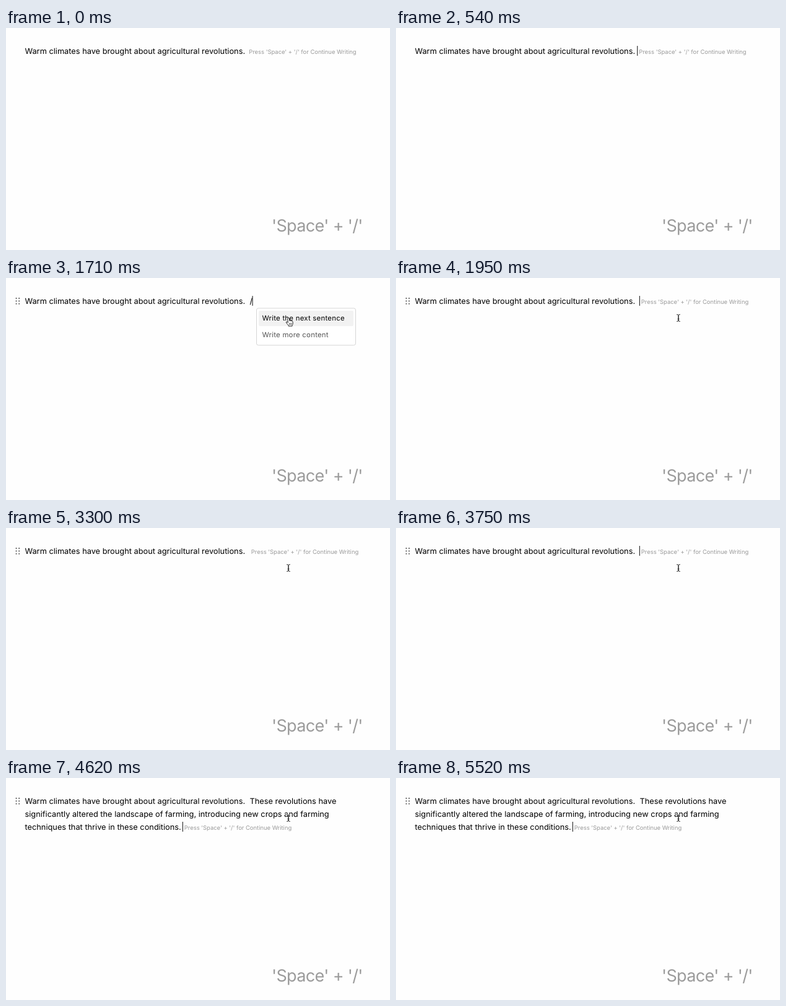
Animation, 620 px wide and 360 px high, one loop 5.55 s. Source, as an HTML page:

```html
<!DOCTYPE html>
<html lang="en">
<head>
<meta charset="utf-8">
<title>Continue writing</title>
<style>
  html, body { margin: 0; width: 100%; height: 100%; overflow: hidden; background: #fefefe; }
  svg { display: block; width: 100vw; height: 100vh; }
  text {
    font-family: Inter, "Liberation Sans", sans-serif;
    font-optical-sizing: none;
    text-rendering: geometricPrecision;
    white-space: pre;
  }
  .body { font-size: 12.79px; fill: #000; }
  .hint { font-size: 9.41px; fill: #9a9a9a; }
  .item { font-size: 11.4px; letter-spacing: .24px; fill: #555; }
  .item.hover { fill: #000; }
  .keys { font-size: 27px; letter-spacing: -.65px; fill: #9b9b9b; }
</style>
</head>
<body>
<svg viewBox="0 0 620 360">
  <g id="handle" fill="#6e6e6e"></g>

  <text class="body" x="30.5" y="41.5">Warm climates have brought about agricultural revolutions.</text>
  <text class="body" id="slash" x="393.5" y="41.5">/</text>
  <g id="reply">
    <text class="body" x="393.5" y="41.5">These revolutions have</text>
    <text class="body" x="30.5" y="62.5">significantly altered the landscape of farming, introducing new crops and farming</text>
    <text class="body" id="last" x="30.5" y="83.5"></text>
  </g>
  <text class="hint" id="hint">Press 'Space' + '/' for Continue Writing</text>
  <rect id="caret" width="1.1" height="16" fill="#222"/>

  <g id="menu">
    <rect x="404.5" y="49" width="160" height="60" rx="3" fill="#fff" stroke="#d6d6d6"/>
    <rect id="glow" x="408" y="53" width="153" height="25" rx="2" fill="#f2f2f2"/>
    <text class="item" id="next" x="413.5" y="69">Write the next sentence</text>
    <text class="item" x="413.5" y="96">Write more content</text>
  </g>

  <g id="pointer">
    <g id="beam" fill="none" stroke-linecap="round">
      <path id="beamHalo" stroke="#fff" stroke-width="2.2"/>
      <path id="beamLine" stroke="#222" stroke-width="1"/>
    </g>
    <g id="hand" stroke="#222" stroke-width="1" stroke-linejoin="round" stroke-linecap="round">
      <path fill="#fff" d="M-1.2 .6Q0 -.8 1.2 .6L1.6 4.6q1 -.9 2 .2q1.2 -.7 1.9 .4q1.6 -.3 1.6 1.4v2.6q0 1.4 -1 2.6v1.4h-6v-1.2q-2.6 -2.6 -3.8 -4.8q0 -1.4 1.4 -.9l1.3 1z"/>
      <path fill="none" stroke-width=".7" d="M1.4 8.4v2.6M3.1 8.4v2.6M4.8 8.4v2.6"/>
    </g>
  </g>

  <text class="keys" x="429" y="329.5">'Space' + '/'</text>
</svg>
<script>
const LOOP = 5550, BLINK = 450;
const OPEN = 570, MOVE = 1350, ARRIVE = 1620, PICK = 1920, READY = 1950;
const STREAM = 4050, DONE = 4230;

const $ = id => document.getElementById(id);
const show = (id, on) => $(id).setAttribute('visibility', on ? 'inherit' : 'hidden');
const place = (id, x, y) => { $(id).setAttribute('x', x); $(id).setAttribute('y', y); };
const mix = (a, b, k) => a + (b - a) * k;
const ease = k => k * k * (3 - 2 * k);

for (const y of [33, 37.4, 41.8])
  for (const x of [16.6, 21.2])
    $('handle').innerHTML += `<circle cx="${x}" cy="${y}" r="1.15"/>`;

const beam = 'M-2.4 -5.6Q0 -5.6 0 -4.2V4.2Q0 5.6 -2.4 5.6M2.4 -5.6Q0 -5.6 0 -4.2V4.2Q0 5.6 2.4 5.6M-1 1.8h2';
$('beamHalo').setAttribute('d', beam);
$('beamLine').setAttribute('d', beam);

// The caret blinks anew from the latest edit.
function caretAt(t) {
  if (t < OPEN) return { x: 389.7, y: 29, on: t >= 330 };
  const [from, x, y] =
    t < PICK ? [OPEN, 398, 29] :
    t < STREAM ? [READY, 393.3, 29] :
    t < DONE ? [STREAM, 177.3, 71] : [DONE, 285.3, 71];
  return { x, y, on: t >= from && Math.floor((t - from) / BLINK) % 2 === 0 };
}

function draw(t) {
  const open = t >= OPEN && t < PICK;
  const k = ease(Math.min(1, Math.max(0, (t - MOVE) / (ARRIVE - MOVE))));
  const px = mix(517, 456, k), py = mix(7.5, 64.8, k);
  const caret = caretAt(t);

  place('caret', caret.x - .5, caret.y);
  show('caret', caret.on);
  place('hint', caret.x + 2.5, caret.y + 12.6);
  show('hint', t < OPEN || t >= READY);

  show('slash', open);
  show('menu', open);
  const hover = open && py > 53;
  show('glow', hover);
  $('next').classList.toggle('hover', hover);

  show('reply', t >= STREAM);
  $('last').textContent = 'techniques that thrive in' + (t >= DONE ? ' these conditions.' : '');

  const over = open && py > 49;
  $('pointer').setAttribute('transform', `translate(${px} ${py})`);
  show('pointer', t >= MOVE);
  show('hand', over);
  show('beam', !over);
  show('handle', t >= MOVE && py > 22);
}

let start;
function tick(now) {
  start ??= now;
  draw((now - start) % LOOP);
  requestAnimationFrame(tick);
}
draw(0);
requestAnimationFrame(tick);
</script>
</body>
</html>
```
